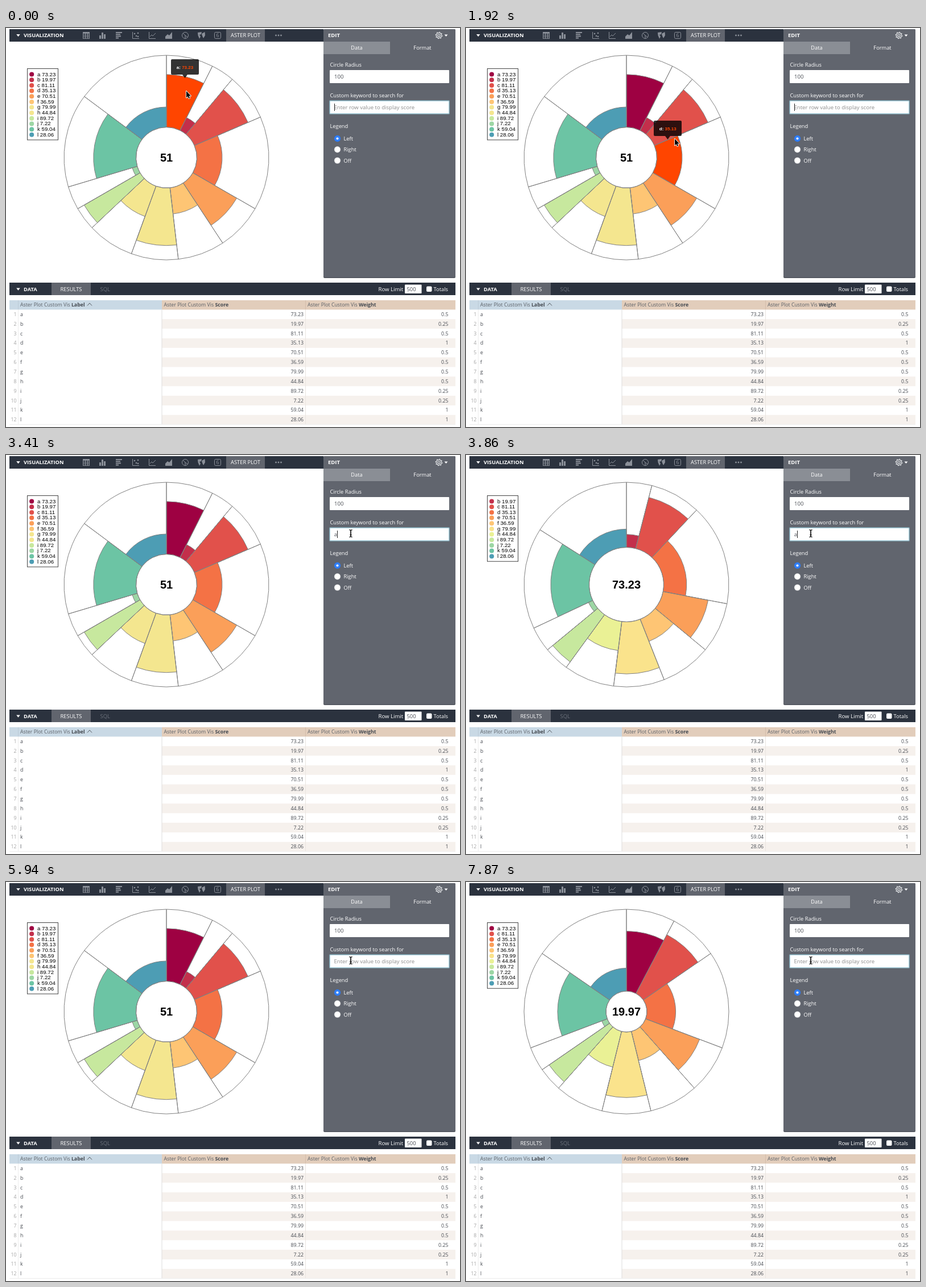
An HTML page with a canvas for the animation above (8 s loop, 798 by 702 pixels).

```html
<!DOCTYPE html>
<html lang="en">
<head>
<meta charset="utf-8">
<title>Aster plot</title>
<style>
html, body { margin: 0; width: 100%; height: 100%; overflow: hidden; background: #fff; }
canvas { display: block; width: 798px; height: 702px; }
</style>
</head>
<body>
<canvas id="stage" width="798" height="702"></canvas>
<script>
const ctx = document.getElementById('stage').getContext('2d');
const LOOP = 8000, TAU = Math.PI * 2;
const SANS = '"Open Sans", sans-serif', ARIAL = '"Liberation Sans", Arial, sans-serif';
const BAR = '#2b323e', PANEL = '#61656e', INK = '#474b52', DIM = '#8b9099';
const CX = 282, CY = 228, R = 180;

const rows = [
  ['a', 73.23, 0.5, '#9e0142'], ['b', 19.97, 0.25, '#c32f4b'],
  ['c', 81.11, 0.5, '#e1514b'], ['d', 35.13, 1, '#f47245'],
  ['e', 70.51, 0.5, '#fb9f59'], ['f', 36.59, 0.5, '#fec574'],
  ['g', 79.99, 0.5, '#fae38c'], ['h', 44.84, 0.5, '#eaf195'],
  ['i', 89.72, 0.25, '#c7e89e'], ['j', 7.22, 0.25, '#9cd6a4'],
  ['k', 59.04, 1, '#6cc4a4'], ['l', 28.06, 1, '#4d9db4']
].map(([label, score, weight, color]) => ({ label, score, weight, color }));

// Timelines: each entry holds from its time until the next one.
const pointer = [
  [0, 317, 111], [150, 317, 114], [300, 317, 122], [450, 317, 134], [600, 318, 148],
  [740, 318, 161], [890, 318, 167], [1030, 318, 168], [1320, 331, 174], [1470, 345, 180],
  [1770, 354, 184], [1920, 367, 195], [2070, 374, 201], [2220, 430, 203],
  [2370, 500, 196], [2520, 545, 186], [2670, 593, 157], [2820, 604, 142], [2960, 606, 138]
];
const hovers = [[0, 'a'], [740, 'b'], [1320, 'c'], [1920, 'd'], [2220, '']];
const tips = [[0, 'a'], [740, 'b'], [1180, ''], [1770, 'c'], [1920, 'd'], [2220, '']];
const carets = [
  [0, 1], [150, 0], [740, 1], [1180, 0], [1770, 1], [2220, 0], [2670, 1], [4010, 0],
  [4450, 1], [4900, 0], [5500, 1], [5940, 0], [6090, 1], [6530, 0], [6980, 1], [7570, 0]
];
const typed = [[0, ''], [3410, 'a'], [5200, ''], [6090, 'b'], [7870, '']];
const keywords = [[0, ''], [3860, 'a'], [5650, ''], [6380, 'b']];
const charts = { '': ['51', 53.5], a: ['73.23', 65.5], b: ['19.97', 36] };
const tipSpots = { a: [314.5, 82], b: [319.5, 157.5], c: [371, 109], d: [354.5, 190] };

function at(list, t) {
  let hit = list[0];
  for (const item of list) if (item[0] <= t) hit = item;
  return hit;
}

function rect(x, y, w, h, fill, radius = 0) {
  ctx.fillStyle = fill;
  ctx.beginPath();
  ctx.roundRect(x, y, w, h, radius);
  ctx.fill();
}

function box(x, y, w, h, stroke) {
  ctx.strokeStyle = stroke;
  ctx.strokeRect(x, y, w, h);
}

function disc(x, y, r, fill) {
  ctx.fillStyle = fill;
  ctx.beginPath();
  ctx.arc(x, y, r, 0, TAU);
  ctx.fill();
}

function path(points, fill, stroke, close = true) {
  ctx.beginPath();
  points.forEach(([x, y]) => ctx.lineTo(x, y));
  if (close) ctx.closePath();
  if (stroke) { ctx.strokeStyle = stroke; ctx.stroke(); }
  if (fill) { ctx.fillStyle = fill; ctx.fill(); }
}

function text(str, x, y, size, color, { weight = 400, align = 'left', family = SANS } = {}) {
  ctx.font = `${weight} ${size}px ${family}`;
  ctx.textAlign = align;
  ctx.fillStyle = color;
  ctx.fillText(str, x, y);
  return ctx.measureText(str).width;
}

function triangle(x, y, w, h, color) {
  path([[x - w / 2, y], [x + w / 2, y], [x, y + h]], color);
}

function icons() {
  ctx.lineWidth = 1;
  box(135.5, 7.5, 11, 11, DIM);
  rect(135, 7, 12, 3, DIM);
  path([[139.5, 9], [139.5, 18]], null, DIM, false);
  path([[143.5, 9], [143.5, 18]], null, DIM, false);
  path([[136, 12.5], [147, 12.5]], null, DIM, false);
  path([[136, 15.5], [147, 15.5]], null, DIM, false);

  [6, 11, 8].forEach((h, i) => rect(164 + i * 4, 19 - h, 3, h, DIM));
  [11, 8, 9, 5].forEach((w, i) => rect(193, 7 + i * 3.2, w, 2, DIM));

  path([[222.5, 7], [222.5, 18.5], [234, 18.5]], null, DIM, false);
  [[226, 10], [229, 14], [232, 9], [232, 15]].forEach(([x, y]) => disc(x, y, 1.3, DIM));

  path([[251.5, 7], [251.5, 18.5], [263, 18.5]], null, DIM, false);
  path([[253, 15], [256, 12], [258, 14], [263, 9]], null, DIM, false);

  path([[280, 19], [280, 15], [284, 11], [287, 13], [292, 7], [292, 19]], DIM);

  ctx.strokeStyle = DIM;
  ctx.beginPath();
  ctx.arc(315, 13, 5.5, 0, TAU);
  ctx.stroke();
  path([[311, 9], [315, 13], [315, 18.5]], null, DIM, false);
  path([[315, 13], [319, 16]], null, DIM, false);

  path([[337, 8], [344, 7], [343, 11], [340, 12], [342, 15], [340, 19], [337.5, 13]], DIM);
  path([[344, 10], [349.5, 7], [350, 13], [347, 18], [345, 14]], DIM);

  ctx.strokeStyle = DIM;
  ctx.beginPath();
  ctx.roundRect(366.5, 7.5, 11, 11, 2);
  ctx.stroke();
  text('6', 372, 16.3, 9, DIM, { align: 'center' });
  [474.5, 479, 483.5].forEach(x => disc(x, 13, 1.4, DIM));
}

function gear(x, y) {
  ctx.strokeStyle = '#e6e8ea';
  ctx.lineWidth = 1.1;
  ctx.beginPath();
  for (let i = 0; i <= 48; i++) {
    const a = i / 48 * TAU, r = 4.9 + 0.9 * Math.tanh(3 * Math.sin(a * 8));
    ctx.lineTo(x + r * Math.cos(a), y + r * Math.sin(a));
  }
  ctx.stroke();
  ctx.beginPath();
  ctx.arc(x, y, 2, 0, TAU);
  ctx.stroke();
  ctx.lineWidth = 1;
}

function topBar() {
  rect(6, 2, 552, 22, BAR);
  triangle(21.5, 11, 6.5, 4.2, '#fff');
  text('VISUALIZATION', 31, 16.4, 9.3, '#fff', { weight: 700 });
  icons();
  rect(387, 2, 68, 22, PANEL);
  text('ASTER PLOT', 421, 16.4, 9.3, '#fff', { align: 'center' });
}

function sidePanel(t) {
  rect(558, 2, 232, 438, '#51555d', 2);
  rect(558, 2, 232, 436.5, PANEL, 2);
  text('EDIT', 566, 16.4, 9.5, '#fff', { weight: 700 });
  gear(761, 13);
  triangle(773.5, 11.5, 6, 3.6, '#fff');
  rect(558, 24, 117, 22, '#8a8e95');
  text('Data', 616.5, 38.4, 9.3, '#fff', { align: 'center' });
  text('Format', 732, 38.4, 9.3, '#fff', { align: 'center' });

  text('Circle Radius', 569.5, 68.2, 9.3, '#fff');
  rect(569, 74, 210, 23, '#fff', 1);
  text('100', 577, 89, 9.6, INK);

  text('Custom keyword to search for', 569.5, 122, 9.3, '#fff');
  rect(568, 127, 212, 25, '#7f9eaa', 2);
  rect(569, 128, 210, 23, '#a9cfdc', 1);
  rect(570, 129, 208, 21, '#fff');
  const word = at(typed, t)[1];
  text(word || 'Enter row value to display score', 576.5, 143, 9.6, word ? '#5b5f66' : '#8b8b8b');
  if (at(carets, t)[1]) rect(word ? 582 : 577, 133, 1, 13, '#222');

  text('Legend', 569.5, 176, 9.3, '#fff');
  ['Left', 'Right', 'Off'].forEach((name, i) => {
    const y = 194.5 + i * 19.3;
    disc(582.5, y, 5.7, i ? '#b9bbbf' : '#2a72e8');
    disc(582.5, y, 5.1, i ? '#fff' : '#307ff8');
    if (!i) disc(582.5, y, 2, '#fff');
    text(name, 593.5, y + 3.4, 9.3, '#fff');
  });
}

function dataTable() {
  rect(6, 448, 784, 22, BAR);
  triangle(21.5, 457.5, 6.5, 4.2, '#fff');
  text('DATA', 31, 462.8, 9.3, '#fff', { weight: 700 });
  rect(80, 448, 69, 22, PANEL);
  text('RESULTS', 114.5, 462.8, 9.4, '#fff', { align: 'center' });
  text('SQL', 165.5, 462.8, 9.4, '#6f747e');
  text('Row Limit', 654.5, 462.6, 9.6, '#fff');
  rect(701, 451.5, 29.5, 15.5, '#fff', 1);
  text('500', 704.5, 462.8, 9.4, INK);
  rect(739, 454.5, 9.5, 9.5, '#fff', 2);
  text('Totals', 751.5, 462.6, 9.4, '#fff');

  rect(6, 479, 268, 16.5, '#c9d9e5');
  rect(274, 479, 516, 16.5, '#e2cdbb');
  rect(21, 479, 1, 16.5, '#bccbd7');
  rect(526, 479, 1, 16.5, '#d4beab');
  [['Label', 25], ['Score', 277.5], ['Weight', 530]].forEach(([name, x]) => {
    const w = text('Aster Plot Custom Vis ', x, 489.8, 8.8, '#5a5f66');
    text(name, x + w, 489.8, 8.8, '#454a51', { weight: 700 });
  });
  path([[143, 488.5], [147, 484], [151, 488.5]], null, '#555b62', false);

  rows.forEach((row, i) => {
    const top = 495.3 + i * 16.86, y = top + 11.5;
    if (i % 2) rect(274, top, 516, 16.86, '#f6f1ed');
    text(i + 1, 18.5, y, 8.8, '#a5a5a5', { align: 'right' });
    text(row.label, 25, y, 8.8, INK);
    text(row.score, 523, y, 8.8, INK, { align: 'right' });
    text(row.weight, 777.5, y, 8.8, INK, { align: 'right' });
  });
  rect(21, 495.5, 1, 202, '#ececec');
  rect(273.5, 495.5, 1, 202, '#dedede');
  rect(526, 495.5, 1, 202, '#e9e4e0');
  rect(6, 697, 784, 1, '#ececec');
}

function wedge(from, to, inner, outer, fill) {
  ctx.beginPath();
  ctx.arc(CX, CY, outer, from, to);
  ctx.arc(CX, CY, inner, to, from, true);
  ctx.closePath();
  if (fill) { ctx.fillStyle = fill; ctx.fill(); }
  ctx.strokeStyle = '#808080';
  ctx.stroke();
}

function plot(t) {
  const key = at(keywords, t)[1], hover = at(hovers, t)[1];
  const [score, inner] = charts[key];
  const list = rows.filter(r => r.label !== key);
  const total = list.reduce((sum, r) => sum + r.weight, 0);
  const shade = r => !key && 'gh'.includes(r.label) ? '#f4e68f' : r.color;
  let angle = -TAU / 4;

  ctx.lineWidth = 1;
  for (const r of list) {
    const end = angle + TAU * r.weight / total;
    wedge(angle, end, inner, inner + (R - inner) * r.score / 100,
      r.label === hover ? '#ff4500' : shade(r));
    wedge(angle, end, inner, R);
    angle = end;
  }
  text(score, CX, 235, 20, '#000', { weight: 700, align: 'center', family: ARIAL });

  box(37.5, 71.5, 54, list.length * 9.7 + 9, '#444');
  list.forEach((r, i) => {
    const y = 81.6 + i * 9.66;
    disc(45.2, y, 4, shade(r));
    text(`${r.label} ${r.score}`, 55, y + 2.9, 9.7, '#000', { family: ARIAL });
  });
}

function tooltip(label) {
  if (!label) return;
  const [x, y] = tipSpots[label];
  const style = { weight: 700, family: ARIAL };
  rect(x - 24.5, y - 27, 49, 27, 'rgba(0,0,0,.8)', 2);
  triangle(x, y, 9, 6, 'rgba(0,0,0,.8)');
  const w = text(label + ': ', x - 14.7, y - 10, 8, '#fff', style);
  text(rows.find(r => r.label === label).score, x - 14.7 + w, y - 10, 8, '#ff4500', style);
}

function cursor(t) {
  const [, x, y] = at(pointer, t);
  ctx.save();
  ctx.translate(x, y);
  if (t < 2820) {
    ctx.lineWidth = 1.8;
    ctx.lineJoin = 'round';
    path([[0, 0], [0, 11.5], [2.6, 9.2], [4.3, 13], [6.1, 12.2], [4.4, 8.5], [8, 8.5]], '#000', '#fff');
  } else {
    for (const [color, width] of [['rgba(255,255,255,.8)', 2.6], ['#111', 1.2]]) {
      ctx.lineWidth = width;
      path([[-2.7, -6.3], [-1, -6.1], [0, -5], [0, 5], [-1, 6.1], [-2.7, 6.3]], null, color, false);
      path([[2.7, -6.3], [1, -6.1], [0, -5], [0, 5], [1, 6.1], [2.7, 6.3]], null, color, false);
      path([[-1.6, 2.5], [1.6, 2.5]], null, color, false);
    }
  }
  ctx.restore();
}

function draw(t) {
  rect(0, 0, 798, 702, '#fff');
  ctx.lineWidth = 1;
  topBar();
  sidePanel(t);
  dataTable();
  plot(t);
  tooltip(at(tips, t)[1]);
  cursor(t);
}

const start = performance.now();
function tick() {
  draw((performance.now() - start) % LOOP);
  requestAnimationFrame(tick);
}
tick();
</script>
</body>
</html>
```
